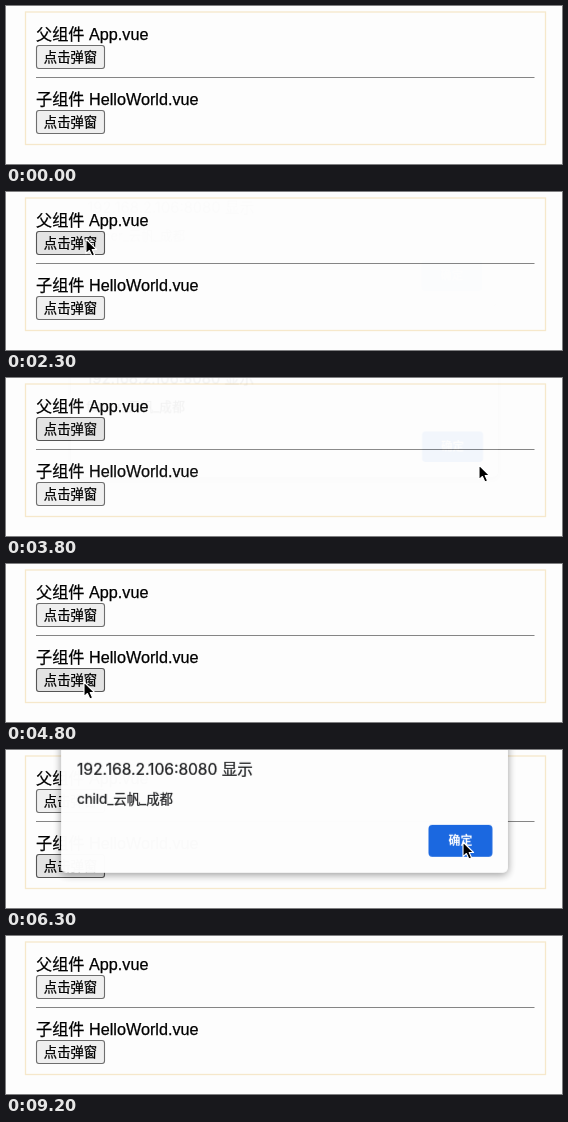
An HTML page for the animation above (9.3 s loop, 556 by 158 pixels).

```html
<!DOCTYPE html>
<html lang="zh-CN">
<head>
<meta charset="utf-8">
<title>弹窗</title>
<style>
  html, body { margin: 0; width: 100%; height: 100%; overflow: hidden; background: #fdfdfd; }
  svg { display: block; width: 556px; height: 158px; }
  text {
    font: 16.2px "Liberation Sans", "Noto Sans CJK SC", sans-serif;
    fill: #000; stroke: #000; stroke-width: .25px;
  }
  .button rect { fill: #efefef; stroke: #6e6e6e; stroke-width: 1.1px; }
  .button text { font-size: 13.33px; text-anchor: middle; }
  .dialog { opacity: 0; transform-origin: 278px 62px; }
  .dialog text { font-family: Inter, "Noto Sans CJK SC", sans-serif; fill: #1b1c1e; stroke: #1b1c1e; }
  .panel { fill: #fdfdfd; filter: drop-shadow(0 2px 4px rgba(0, 0, 0, .4)); }
  .dialog .title { font-size: 15.6px; }
  .dialog .message { font-size: 13.4px; }
  .dialog .ok { font-size: 12px; font-weight: 700; fill: #fff; stroke: none; text-anchor: middle; }
</style>
</head>
<body>
<svg viewBox="0 0 556 158">
  <rect x="19.5" y="6" width="520" height="132.5" fill="none" stroke="#f6e8cb" stroke-width="1.3"/>
  <text x="30" y="33.5">父组件 App.vue</text>
  <g class="button" id="parent">
    <rect x="30.5" y="39.5" width="68" height="23" rx="2.5"/>
    <text x="64.5" y="56">点击弹窗</text>
  </g>
  <path d="M30 71.5H528.5" stroke="#858585"/>
  <text x="30" y="98.5">子组件 HelloWorld.vue</text>
  <g class="button" id="child">
    <rect x="30.5" y="104.5" width="68" height="23" rx="2.5"/>
    <text x="64.5" y="121">点击弹窗</text>
  </g>
  <g id="dialogs"></g>
  <path id="cursor" d="M0 0V14.6L3.4 11.5L5.9 17L8.6 15.8L6.2 10.5H10.6Z"
        fill="#000" stroke="#fff" stroke-width="1.1" stroke-linejoin="round"/>
</svg>
<script>
const LOOP = 9300;

// Each step is [time in ms, style, easing toward the next step].
function play(element, steps) {
  const frames = steps.map(([time, style, easing = 'linear']) =>
    ({ offset: time / LOOP, easing, ...style }));
  const first = { ...frames[0], offset: 0, easing: 'step-end' };
  const last = { ...frames[frames.length - 1], offset: 1 };
  element.animate([first, ...frames, last], { duration: LOOP, iterations: Infinity });
}

function addDialog(message, open, close, gone) {
  const group = document.createElementNS('http://www.w3.org/2000/svg', 'g');
  group.setAttribute('class', 'dialog');
  group.innerHTML = `
    <rect class="panel" x="55" y="-12" width="447" height="135" rx="5"/>
    <text class="title" x="71" y="25.5">192.168.2.106:8080 显示</text>
    <text class="message" x="71" y="54">${message}</text>
    <rect x="422.5" y="75" width="64" height="32" rx="4" fill="#1967e0"/>
    <text class="ok" x="454.5" y="95.5">确定</text>`;
  document.getElementById('dialogs').append(group);

  const pose = (opacity, y, scale) =>
    ({ opacity, transform: `translate(0px, ${y}px) scale(${scale})` });
  play(group, [
    [open, pose(0, -6, .95), 'ease-out'],
    [open + 150, pose(1, 0, 1)],
    [close, pose(1, 0, 1), 'ease-out'],
    [close + 200, pose(.05, -21, .955)],
    [gone, pose(0, -21, .955)]
  ]);
}

function hover(id, from, to) {
  const idle = { fill: '#efefef', stroke: '#6e6e6e' };
  const active = { fill: '#e3e3e3', stroke: '#555555' };
  play(document.querySelector(`#${id} rect`), [
    [from, idle, 'step-end'],
    [from + 1, active, 'step-end'],
    [to, idle]
  ]);
}

addDialog('father_云帆_成都', 2300, 3600, 4000);
addDialog('child_云帆_成都', 5000, 6300, 6650);
hover('parent', 950, 4300);
hover('child', 4700, 6900);

const at = (x, y) => ({ transform: `translate(${x}px, ${y}px)` });
play(document.getElementById('cursor'), [
  [60, at(530, 162), 'ease-in-out'],
  [1000, at(80, 47)],
  [2450, at(80, 47), 'ease-in'],
  [2900, at(437, 75), 'ease-out'],
  [3250, at(473, 87)],
  [4220, at(473, 87), 'ease-in'],
  [4500, at(270, 125), 'ease-out'],
  [4800, at(78, 118)],
  [5250, at(78, 118), 'ease-in-out'],
  [5900, at(457, 92)],
  [7420, at(457, 92), 'ease-in'],
  [7800, at(474, 162)]
]);
</script>
</body>
</html>
```
